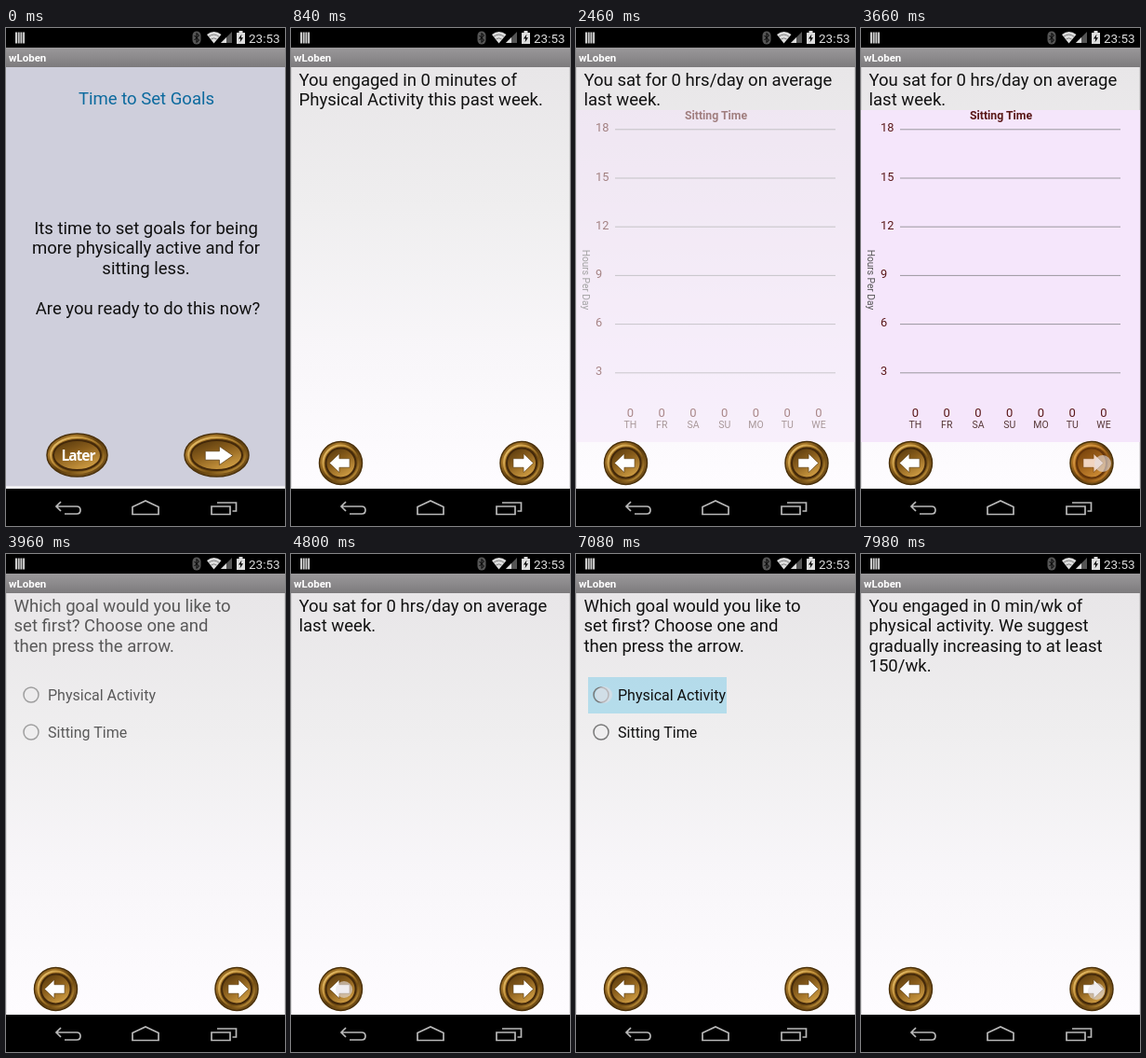
Write an HTML page that moves like this. It is 300 px wide and 534 px high and loops after 8000 ms.

```html
<!DOCTYPE html>
<html lang="en">
<head>
<meta charset="utf-8">
<title>Goal setting</title>
<style>
  html, body { margin: 0; width: 100%; height: 100%; overflow: hidden; background: #000; }
  svg { display: block; width: 100%; height: 100%; font-family: Roboto, sans-serif; }
  .body { font-size: 18.55px; fill: #111; }
  .mid { text-anchor: middle; }
</style>
</head>
<body>
<svg id="stage" viewBox="0 0 300 534"></svg>
<script>
const LOOP = 8000, STEP = 60, LINE = 21.6;

const lines = (rows, x, y, cls = "body") => rows.map((row, i) =>
  `<text class="${cls}" x="${x}" y="${y + i * LINE}">${row}</text>`).join("");

const ellipse = (cx, cy, rx, ry, attrs) =>
  `<ellipse cx="${cx}" cy="${cy}" rx="${rx}" ry="${ry}" ${attrs}/>`;

// Concentric bevelled rings around a shaded centre
const gold = (cx, cy, rx, ry) =>
  ellipse(cx, cy, rx, ry, 'fill="url(#rim)" stroke="#4a300a" stroke-width="1.5"') +
  ellipse(cx, cy, rx - 4, ry - 4, 'fill="none" stroke="url(#shine)" stroke-width="2"') +
  ellipse(cx, cy, rx - 7, ry - 7, 'fill="url(#dish)" stroke="#44290a" stroke-width="2"');

const arrow = (x, y, sx, sy = sx) =>
  `<path transform="translate(${x} ${y}) scale(${sx} ${sy})" d="M11 0 1 -9.5V-4.5H-9.5V4.5H1V9.5Z"
    fill="#fff" stroke="#5b3d10" stroke-width=".6"/>`;

function chart({ title, unit, top, back, ink, day, accent }) {
  let out = `<rect y="88" width="300" height="356" fill="${back}"/>
    <text class="mid" x="150.5" y="98" font-size="12.3" font-weight="700" fill="${ink}">${title}</text>
    <text class="mid" transform="translate(6.5 270) rotate(90)" font-size="10.2" fill="#555">${unit} Per Day</text>`;
  for (let i = 0; i < 6; i++) {
    const y = 108.8 + i * 52.2;
    out += `<path d="M42 ${y}H279" stroke="#9b989f"/>
      <text x="21" y="${y + 2.5}" font-size="12.8" fill="${ink}">${top * (6 - i) / 6}</text>`;
  }
  ["TH", "FR", "SA", "SU", "MO", "TU", "WE"].forEach((name, i) => {
    const x = 58.5 + i * 33.75;
    const label = name === "TU" ? `T<tspan fill="${accent}">U</tspan>` : name;
    const color = name === "FR" || name === "SU" ? accent : day;
    out += `<text class="mid" x="${x}" y="417" font-size="13" fill="${ink}">0</text>
      <text class="mid" x="${x}" y="429" font-size="10.5" fill="${color}">${label}</text>`;
  });
  return out;
}

const option = (y, label) =>
  `<circle cx="27" cy="${y}" r="8" fill="none" stroke="#777" stroke-width="1.5"/>
   <text x="45" y="${y + 5.5}" font-size="16" fill="#111">${label}</text>`;

const bodies = {
  active: chart({ title: "Physical Activity", unit: "Minutes", top: 90, back: "#cfcfdc",
    ink: "#111", day: "#333", accent: "#1b7db5" }),
  sitting: chart({ title: "Sitting Time", unit: "Hours", top: 18, back: "#f5e6fb",
    ink: "#5a1818", day: "#573838", accent: "#573838" }),
  choice: lines(["Which goal would you like to", "set first? Choose one and", "then press the arrow."], 8.5, 61.5) +
    '<rect id="press" x="13" y="132" width="149" height="39" fill="#33b5e5" opacity=".3"/>' +
    option(151, "Physical Activity") + option(191, "Sitting Time") +
    '<circle id="pick" cx="27" cy="151" r="4.5" fill="#33b5e5"/>'
};

const notes = {
  active: ["You engaged in 0 minutes of", "Physical Activity this past week."],
  sitting: ["You sat for 0 hrs/day on average", "last week."],
  advice: ["You engaged in 0 min/wk of", "physical activity. We suggest", "gradually increasing to at least", "150/wk."]
};

const groups = (prefix, set, draw) => Object.entries(set).map(([key, value]) =>
  `<g id="${prefix}-${key}">${draw(value)}</g>`).join("");

const bar = '<rect y="21" width="300" height="21" fill="url(#bar)"/>' +
  '<text x="3" y="35.5" font-size="11.5" font-weight="700" fill="#fff">wLoben</text>';

const goals = `${bar}<rect y="42" width="300" height="449" fill="#cfcfdc"/>
  <rect y="491" width="300" height="3" fill="#eeedf2"/>
  <text class="mid" x="151" y="82" font-size="18.55" fill="#0c6a9e">Time to Set Goals</text>
  ${lines(["Its time to set goals for being", "more physically active and for", "sitting less."], 150.5, 220.5, "body mid")}
  ${lines(["Are you ready to do this now?"], 152.5, 306.9, "body mid")}
  ${gold(76.5, 458, 32.5, 23)}${gold(226.5, 458, 34.5, 23)}
  <text class="mid" x="77.5" y="464" font-family="'Open Sans', sans-serif" font-size="15.5"
    font-weight="700" letter-spacing="-1" fill="#fff">Later</text>
  ${arrow(228, 458.5, 1.45, 1.05)}`;

const page = `${bar}<rect y="42" width="300" height="452" fill="url(#paper)"/>
  <path d="M.5 42V494M299.5 42V494" stroke="#aaa" opacity=".3"/>
  ${groups("note", notes, rows => lines(rows, 8.5, 61.5))}
  ${groups("body", bodies, art => art)}
  ${gold(53.5, 466.5, 23, 23)}${gold(248, 466.5, 23, 23)}
  ${arrow(53, 466.5, -1.06, 1.06)}${arrow(249, 466.5, 1.06)}`;

const system = `<rect width="300" height="21" fill="#000"/><rect y="494" width="300" height="40" fill="#000"/>
  <path d="M11 4.5V16.5M13.7 4.5V16.5M16.4 4.5V16.5M19.1 4.5V16.5" stroke="#ccc" stroke-width="2"/>
  <rect x="200.5" y="3.5" width="9" height="14" rx="4.5" fill="#555"/>
  <path d="M202.5 8 207.5 13 205 15.5V5.5L207.5 8 202.5 13" fill="none" stroke="#000"/>
  <path d="M216 7Q223.5 1 231.5 7L223.5 16.5Z" fill="#ddd"/>
  <path d="M218 9.2Q223.5 5 229 9.2M220.5 12Q223.5 9.8 226.5 12" fill="none" stroke="#555" stroke-width=".7"/>
  <path d="M231 16H243V4Z" fill="#555"/><path d="M231 16H237V10Z" fill="#ddd"/>
  <path d="M248 5H250.5V3H254.5V5H257V17H248Z" fill="#ddd"/><path d="M253.5 6.5 250 11.5H252.3L251.5 15.5 255 10.3H252.7Z" fill="#000"/>
  <text x="261" y="15.5" font-size="13.5" fill="#ddd">23:53</text>
  <g fill="none" stroke="#b9b9b9" stroke-width="1.7">
    <path d="M59 508 54 513 59 518M54 513H76Q80 513 80 517T76 521H63"/>
    <path d="M136 521.5V513.5L150 507 164 513.5V521.5Z"/>
    <path d="M221 513H241V521.5H221ZM227 509H247.5V518H243.5"/>
  </g>`;

const stage = document.getElementById("stage");
const gradient = (id, stops, slant = 0) =>
  `<linearGradient id="${id}" x2="${slant}" y2="1">${stops.map((color, i) =>
    `<stop offset="${i / (stops.length - 1)}" stop-color="${color}"/>`).join("")}</linearGradient>`;

stage.innerHTML = `<defs>
  ${gradient("bar", ["#9a989a", "#8c8a8c", "#7c7a7c"])}
  ${gradient("paper", ["#e8e6e8", "#efeeef", "#f8f6f9", "#fefcff"])}
  ${gradient("rim", ["#6d480f", "#a8782a", "#5c3c0c", "#80591c", "#4a300a"], 1)}
  ${gradient("shine", ["#f0cd7c", "#c8973f", "#7a5214", "#d5a548"], 1)}
  ${gradient("dish", ["#4f330b", "#8a5e1c", "#cd9b42"], .6)}
  </defs><g id="goals">${goals}</g><g id="page">${page}</g>
  <circle id="glow" cx="248" cy="466.5" r="21" fill="#c65a08" opacity=".25"/>
  <circle id="touch" r="9" fill="#e4dfe4"/>${system}`;

const $ = id => document.getElementById(id);
const clamp = v => Math.max(0, Math.min(1, v));
const fade = (id, value) => $(id).setAttribute("opacity", value);
const show = (id, on) => $(id).style.display = on ? "" : "none";

// Start, note, body, body fade start and end
const views = [
  [0, "active", "active", 840, 960],
  [2340, "sitting", "sitting", 2400, 2520],
  [3780, "", "choice", 3840, 4020],
  [4800, "sitting", "sitting", 4920, 5100],
  [5820, "", "choice", 5880, 6120],
  [7980, "advice", "", 0, 1]
];

// Start, end, x, y
const taps = [
  [420, 600, 238, 460], [2220, 2400, 258, 467], [3660, 3840, 260, 467], [4800, 4980, 57, 467],
  [5760, 5940, 253, 469], [7080, 7200, 30, 151], [7920, 8100, 253, 469]
];

function draw(now) {
  const t = Math.floor(now % LOOP / STEP) * STEP;
  const [start, note, body, from, to] = views.findLast(v => v[0] <= t);
  const enter = clamp((t - 480) / 240);
  fade("page", enter);
  $("page").setAttribute("transform", `translate(0 ${(1 - enter) ** 2 * 36})`);

  for (const key in notes) show("note-" + key, key === note && t >= 720);
  for (const key in bodies) {
    show("body-" + key, key === body);
    fade("body-" + key, clamp((t - from) / (to - from)));
  }
  show("press", t >= 7080 && t < 7200);
  show("pick", t >= 7200);

  const tap = taps.find(([down, up]) => t >= down && t < up);
  show("touch", tap);
  // The right button glows until its tap opens the next view
  show("glow", tap && tap[2] > 240 && start < tap[0]);
  if (tap) {
    const [, up, x, y] = tap;
    $("touch").setAttribute("transform", `translate(${x} ${y})`);
    fade("touch", .6 * clamp((up - t) / 120));
  }
}

function tick(now) {
  draw(now);
  requestAnimationFrame(tick);
}
draw(0);
requestAnimationFrame(tick);
</script>
</body>
</html>
```
